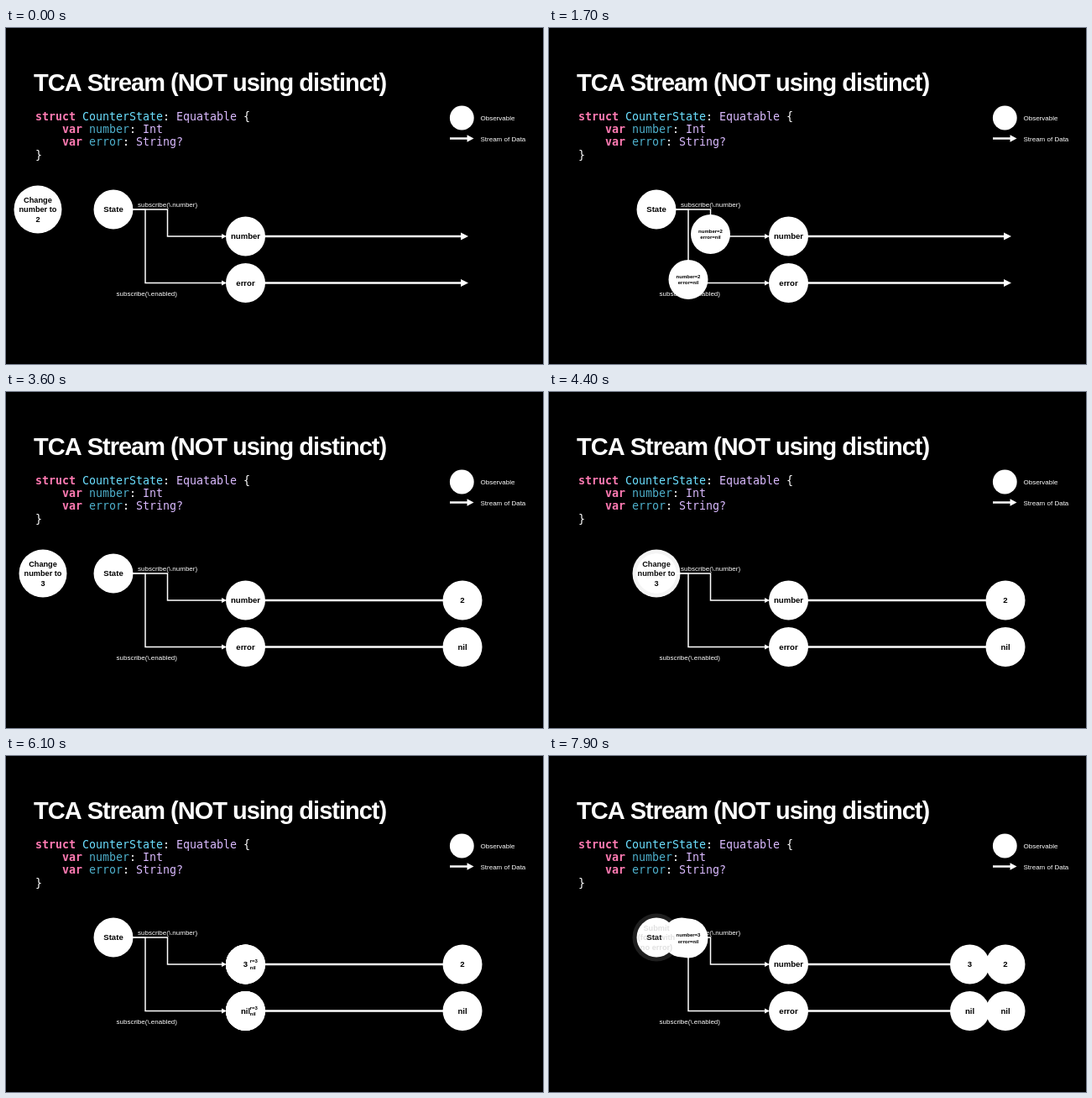
Animation, 640 px wide and 400 px high, one loop 8000 ms. Source, as an HTML page with a canvas:

```html
<!DOCTYPE html>
<html lang="en">
<head>
<meta charset="utf-8">
<title>TCA Stream</title>
<style>
  html, body { margin: 0; width: 100%; height: 100%; overflow: hidden; background: #000; }
  canvas { display: block; }
</style>
</head>
<body>
<canvas id="stage" width="640" height="400"></canvas>
<script>
const ctx = document.getElementById('stage').getContext('2d');
const LOOP = 8000, R = 23.5;
const SANS = '"Liberation Sans", Arial, sans-serif';
const MONO = '"DejaVu Sans Mono", monospace';
const WHITE = '#fff', PINK = '#ff7ab2', CYAN = '#6bdfff', TEAL = '#4eb0cc', LILAC = '#dabaff';

// [line, column, text, colour]
const code = [
  [0, 0, 'struct', PINK], [0, 7, 'CounterState', CYAN], [0, 19, ':', WHITE],
  [0, 21, 'Equatable', LILAC], [0, 31, '{', WHITE],
  [1, 4, 'var', PINK], [1, 8, 'number', TEAL], [1, 14, ':', WHITE], [1, 16, 'Int', LILAC],
  [2, 4, 'var', PINK], [2, 8, 'error', TEAL], [2, 13, ':', WHITE], [2, 15, 'String?', LILAC],
  [3, 0, '}', WHITE]
];

const branches = [
  { name: 'number', y: 248, path: [[128, 216], [192.5, 216], [192.5, 248], [285.5, 248]] },
  { name: 'error', y: 303.5, path: [[128, 216], [166, 216], [166, 303.5], [285.5, 303.5]] }
];

const rounds = [
  { at: 0, action: ['Change', 'number to', '2'], value: 2, stop: 544 },
  { at: 3500, action: ['Change', 'number to', '3'], value: 3, stop: 501.5 },
  { at: 6590, action: ['Submit', '(form with', 'no error)'], value: 3, stop: 459 }
];

const span = (t, a, b) => Math.min(1, Math.max(0, (t - a) / (b - a)));
const ease = u => (1 - Math.cos(Math.PI * u)) / 2;
const mix = (a, b, u) => a + (b - a) * u;

function text(str, x, y, size, { color = WHITE, weight = 400, align = 'left', family = SANS, spacing = 0 } = {}) {
  ctx.font = `${weight} ${size}px ${family}`;
  ctx.letterSpacing = spacing + 'px';
  ctx.textAlign = align;
  ctx.fillStyle = color;
  ctx.fillText(str, x, y);
}

function ball(x, y, r, lines = [], size = 9.6, gap = 11.2) {
  ctx.fillStyle = WHITE;
  ctx.beginPath();
  ctx.arc(x, y, r, 0, 7);
  ctx.fill();
  lines.forEach((line, i) => text(line, x, y + size * 0.36 + (i - (lines.length - 1) / 2) * gap, size,
    { color: '#000', weight: 700, align: 'center' }));
}

function arrow(points, width, head, half) {
  const [x, y] = points[points.length - 1];
  ctx.strokeStyle = ctx.fillStyle = WHITE;
  ctx.lineWidth = width;
  ctx.beginPath();
  points.slice(0, -1).forEach(p => ctx.lineTo(...p));
  ctx.lineTo(x - head + 0.5, y);
  ctx.stroke();
  ctx.beginPath();
  ctx.moveTo(x, y);
  ctx.lineTo(x - head, y - half);
  ctx.lineTo(x - head, y + half);
  ctx.fill();
}

function along(path, u) {
  const lengths = path.slice(1).map((p, i) => Math.hypot(p[0] - path[i][0], p[1] - path[i][1]));
  let left = u * lengths.reduce((a, b) => a + b);
  for (let i = 0; i < lengths.length; i++) {
    if (left <= lengths[i]) {
      const k = left / lengths[i];
      return [mix(path[i][0], path[i + 1][0], k), mix(path[i][1], path[i + 1][1], k)];
    }
    left -= lengths[i];
  }
  return path[path.length - 1];
}

function scene() {
  ctx.fillStyle = '#000';
  ctx.fillRect(0, 0, 640, 400);
  text('TCA Stream (NOT using distinct)', 33, 74.5, 29, { weight: 700, spacing: -1 });
  for (const [line, col, str, color] of code)
    text(str, 35 + col * 8, 109.5 + line * 15.35, 13.3, { color, weight: color === PINK ? 700 : 400, family: MONO });

  ball(543.3, 107, 14.4);
  text('Observable', 565.5, 110, 8);
  arrow([[529, 131.5], [557.5, 131.5]], 2.5, 8, 4.2);
  text('Stream of Data', 565.5, 134.5, 8);

  for (const { name, y, path } of branches) {
    arrow([...path.slice(0, 3), [263, y]], 1.5, 6, 3);
    arrow([[300, y], [551, y]], 2.7, 9, 4.6);
    ball(285.5, y, R, [name]);
  }
  text('subscribe(\\.number)', 157, 213, 8);
  text('subscribe(\\.enabled)', 131.5, 319, 8);
  ball(128, 216, R, ['State']);
}

function packets(t, value) {
  if (t < 880 || t > 2650) return;
  const u = ease(span(t, 880, 2530));
  for (const { path } of branches)
    ball(...along(path, u), R, ['number=' + value, 'error=nil'], 6, 7.4);
}

function results(t, { value, stop }) {
  if (t < 2530) return;
  const x = mix(285.5, stop, ease(span(t, 2820, 3520)));
  const shown = span(t, 2530, 2650) * 2 * R;
  branches.forEach(({ y }, i) => {
    ctx.save();
    ctx.beginPath();
    ctx.rect(x - R - 1, y - R - 1, shown + 2, 2 * R + 2);
    ctx.clip();
    ball(x, y, R, [i ? 'nil' : String(value)]);
    ctx.restore();
  });
}

function action(t, lines) {
  if (t < -260 || t > 1370) return;
  const enter = ease(span(t, -260, 60));
  const x = mix(mix(-30, 44, enter), 128, ease(span(t, 200, 880)));
  ctx.globalAlpha = 1 - span(t, 880, 1370);
  ball(x, 216, 28.5, lines, 9.2);
  ctx.globalAlpha = 1;
}

const start = performance.now();
function frame() {
  const now = (performance.now() - start) % LOOP;
  scene();
  // Later results sit beneath earlier ones once they have arrived
  for (const r of [...rounds].reverse()) results(now - r.at, r);
  for (const r of rounds) {
    packets(now - r.at, r.value);
    if (now - r.at < 2700) results(now - r.at, r);
    // The opening circle is already waiting when the loop begins
    action(now - r.at, r.action);
  }
  requestAnimationFrame(frame);
}
frame();
</script>
</body>
</html>
```
